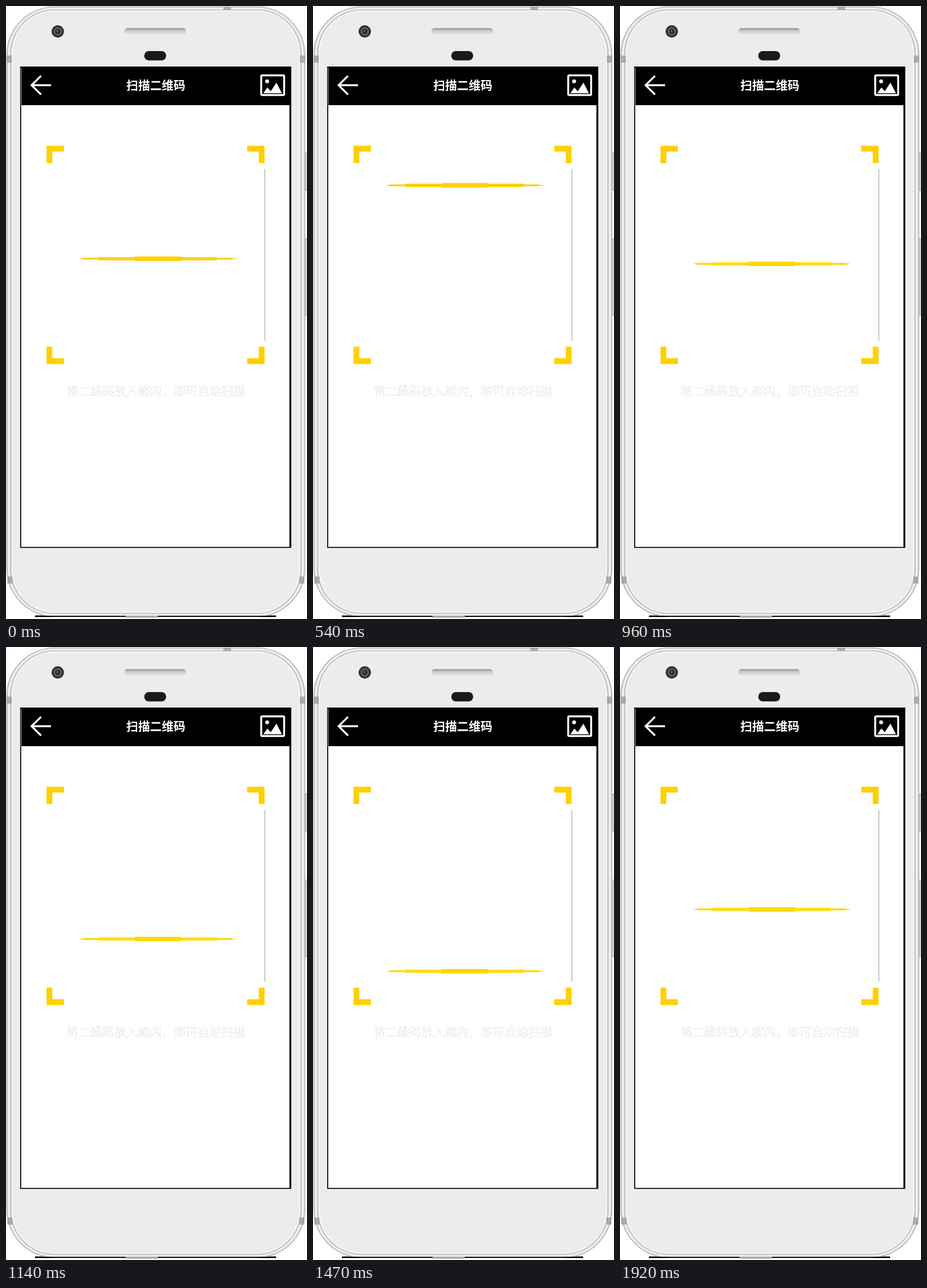
An HTML page for the animation above (1950 ms loop, 468 by 952 pixels).

```html
<!DOCTYPE html>
<html lang="zh-CN">
<head>
<meta charset="utf-8">
<title>扫描二维码</title>
<style>
  html, body { margin: 0; width: 100%; height: 100%; overflow: hidden; background: #fff; }
  svg { display: block; width: 100vw; height: 100vh; }
  text { font-family: "Noto Sans CJK SC", "Noto Sans CJK", sans-serif; text-anchor: middle; }
</style>
</head>
<body>
<svg viewBox="0 0 468 952">
  <defs>
    <linearGradient id="button">
      <stop offset="0" stop-color="#777"/>
      <stop offset=".5" stop-color="#ddd"/>
      <stop offset="1" stop-color="#aaa"/>
    </linearGradient>
    <linearGradient id="speaker" x2="0" y2="1">
      <stop offset="0" stop-color="#888"/>
      <stop offset=".35" stop-color="#c6c6c6"/>
      <stop offset="1" stop-color="#e4e4e4"/>
    </linearGradient>
    <radialGradient id="lens">
      <stop offset="0" stop-color="#111"/>
      <stop offset=".4" stop-color="#333"/>
      <stop offset=".55" stop-color="#777"/>
      <stop offset=".7" stop-color="#2c2c2c"/>
      <stop offset="1" stop-color="#3a3a3a"/>
    </radialGradient>
  </defs>

  <g fill="url(#button)" stroke="#888" stroke-width=".8">
    <rect x="463" y="228.5" width="7" height="57.5"/>
    <rect x="463" y="362" width="7" height="118"/>
  </g>
  <path d="M45 947.8H186M236 947.8H420" stroke="#000" stroke-width="2.4"/>
  <g id="shell"></g>
  <g fill="#999" opacity=".75">
    <path d="M1 77h8v11h-8zM457 77h8v11h-8zM2 886h8v11h-8zM456 886h8v11h-8z"/>
    <path d="M338 1h12v5h-12z"/>
  </g>
  <path d="M186 948.5H236" stroke="#aaa" stroke-width="3"/>
  <path d="M45 947.8H186M236 947.8H420" stroke="#000" stroke-width="1.4"/>

  <circle cx="80.5" cy="39.5" r="9.7" fill="url(#lens)"/>
  <circle cx="80" cy="39" r="2" fill="#555"/>
  <rect x="184" y="34.5" width="96" height="9.5" rx="4.7" fill="url(#speaker)"/>
  <rect x="215" y="70" width="34" height="14.5" rx="7" fill="#1a1a1a"/>

  <rect x="22" y="94" width="421.5" height="747.5" fill="#000"/>
  <path d="M23.6 154H440V840H23.6z" fill="#fff"/>
  <path d="M23.5 96V154M440.5 154V840" stroke="#aaa"/>

  <g fill="none" stroke="#fff" stroke-width="3">
    <path d="M54.5 108.5L39.8 123L54.5 137.5M39.8 123H70"/>
    <rect x="396.8" y="107.8" width="35.7" height="30.5" rx="1.5"/>
  </g>
  <circle cx="406" cy="117" r="3" fill="#fff"/>
  <path d="M400 135.5L406.5 126.5L411.5 132.5L420.5 119L429 135.5z" fill="#fff"/>
  <text x="233" y="130" font-size="18.4" font-weight="700" fill="#fff">扫描二维码</text>

  <path d="M402.5 253V520" stroke="#aaa"/>
  <g id="corners" fill="#ffd000"></g>
  <text x="233" y="604.5" font-size="18.5" fill="#fff" stroke="#d6d6d6" stroke-width=".55" stroke-dasharray="4 2">将二维码放入框内，即可自动扫描</text>

  <g id="beam" shape-rendering="crispEdges"></g>
</svg>
<script>
  const byId = id => document.getElementById(id);

  function add(parent, tag, attrs) {
    const node = document.createElementNS("http://www.w3.org/2000/svg", tag);
    for (const key in attrs) node.setAttribute(key, attrs[key]);
    return parent.appendChild(node);
  }

  // Nested rounded layers form the metal edge: inset, colour.
  [[0, "#aaa"], [1.2, "#dcdcdc"], [3, "#f7f7f7"], [5, "#d2d2d2"],
   [6.5, "#b8b8b8"], [7.7, "#fafafa"], [9.5, "#ececec"]].forEach(([inset, fill]) =>
    add(byId("shell"), "rect", {
      x: .7 + inset, y: .7 + inset * .8, fill,
      width: 464.6 - inset * 2, height: 948 - inset * 1.6, rx: 75 - inset
    }));

  [[63, 217, 1, 1], [402, 217, -1, 1], [63, 556, 1, -1], [402, 556, -1, -1]].forEach(([x, y, sx, sy]) =>
    add(byId("corners"), "path", {
      d: "M0 0H27V9H9V27H0z",
      transform: `translate(${x} ${y}) scale(${sx} ${sy})`
    }));

  const beam = byId("beam");
  // Strips of the beam: half length, thickness.
  const strips = [[121, 1], [116, 3], [92.5, 5], [36, 7]].map(([half, thick]) =>
    add(beam, "rect", {
      x: 235.5 - half, y: -thick / 2, width: half * 2, height: thick
    }));

  const STEP = 30, STEPS = 65, TOP_STEP = 17, BOTTOM_STEP = 46;
  const upperFills = ["#d8b830", "#ffd21a", "#ffd000", "#ffd000"];
  const lowerFills = ["#d8c470", "#ffd800", "#ffdc20", "#ffd800"];

  function beamY(step) {
    if (step < TOP_STEP) return 392.5 - 7.2 * step;
    if (step < BOTTOM_STEP) return 270.1 + 8.72 * (step - TOP_STEP);
    return 523 - 6.42 * (step - BOTTOM_STEP);
  }

  function draw(time) {
    const step = Math.floor(time / STEP) % STEPS;
    const y = Math.floor(beamY(step) + .01) + .5;
    const fills = y < 400 ? upperFills : lowerFills;
    beam.setAttribute("transform", `translate(0 ${y})`);
    strips.forEach((strip, i) => strip.setAttribute("fill", fills[i]));
  }

  const start = performance.now();
  function tick() {
    draw(performance.now() - start);
    requestAnimationFrame(tick);
  }
  tick();
</script>
</body>
</html>
```
